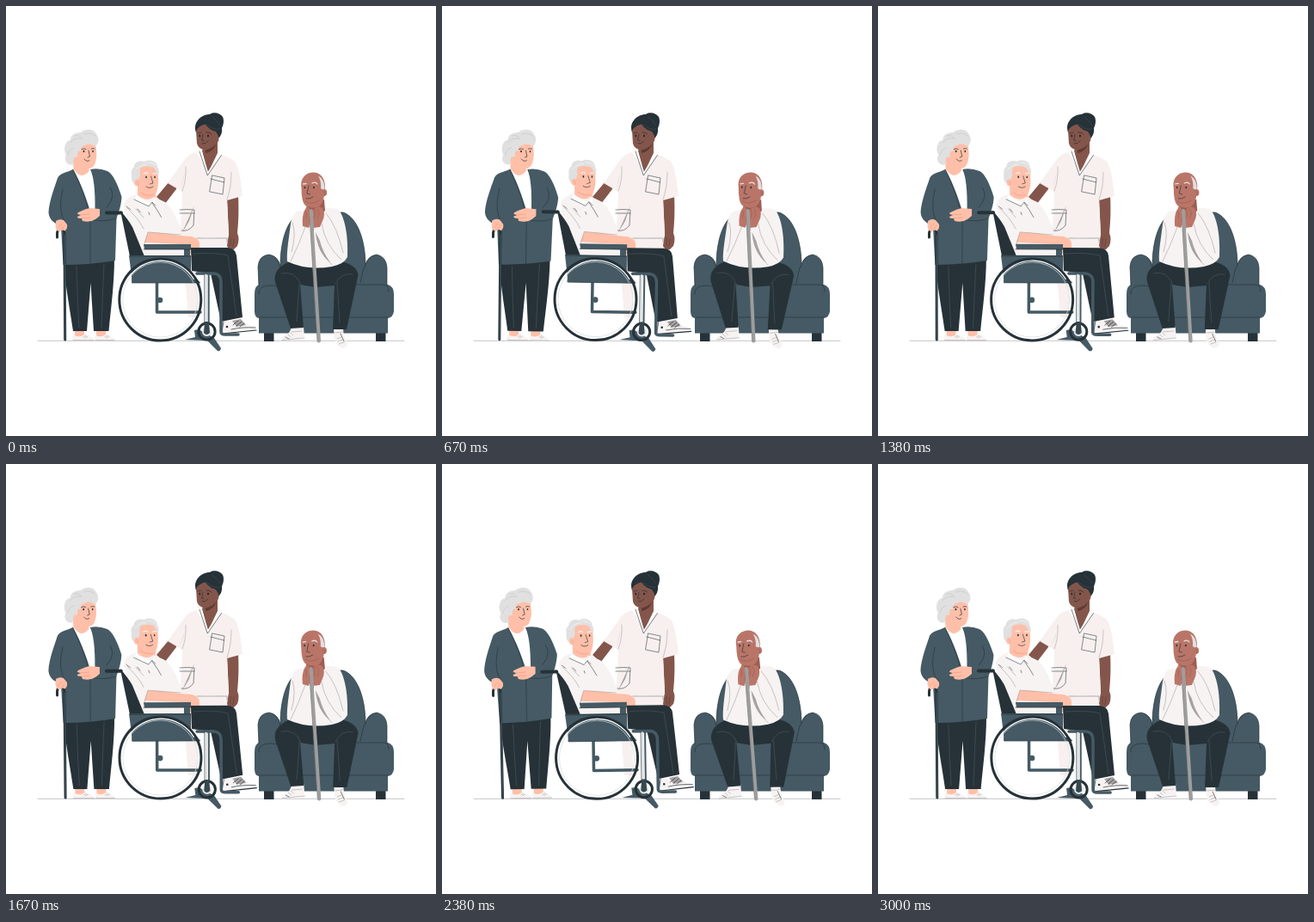
These frames come from a looping animation (500x500 px, 3040 ms). An HTML page:

```html
<!DOCTYPE html>
<html lang="en">
<head>
<meta charset="utf-8">
<title>Care home</title>
<style>
  html, body { margin: 0; width: 100%; height: 100%; overflow: hidden; background: #fff; }
  svg { display: block; width: 100vw; height: 100vh; }
</style>
</head>
<body>
<svg id="stage" viewBox="0 0 500 500" xmlns="http://www.w3.org/2000/svg"></svg>
<script>
const INK = '#263238', SLATE = '#455a64', DEEP = '#37474f';
const PEACH = '#ffbfa8', PEACH_SHADE = '#f0937c';
const BROWN = '#84564b', BROWN_SHADE = '#5d3a32', TAN = '#b97568', TAN_SHADE = '#9d5d50';
const SCRUBS = '#f7f0ee', SHIRT = '#f7f3f2', HAIR = '#e0e0e0', FOLD = '#a7a2a2';

const fill = (color, d) => `<path d="${d}" fill="${color}"/>`;
const line = (color, width, d) =>
  `<path d="${d}" fill="none" stroke="${color}" stroke-width="${width}" stroke-linecap="round" stroke-linejoin="round"/>`;
const disc = (color, x, y, rx, ry = rx) => `<ellipse cx="${x}" cy="${y}" rx="${rx}" ry="${ry}" fill="${color}"/>`;
const ring = (color, width, x, y, r) =>
  `<circle cx="${x}" cy="${y}" r="${r}" fill="none" stroke="${color}" stroke-width="${width}"/>`;
const group = (id, ...parts) => `<g id="${id}">${parts.join('')}</g>`;

const floor = line('#b4b9bc', .8, 'M37 389.3H463');

const woman = group('woman',
  // feet and trousers
  fill(SHIRT, 'M79 382C84 384 87 382 90 381L101 386Q103 388 101 389H78Q76 386 79 382ZM105 382C109 384 113 382 116 381L125 386Q127 388 125 389H104Q102 386 105 382Z'),
  fill(PEACH, 'M80 376H91V382Q86 386 80 383ZM105 376H116V382Q110 386 105 383Z'),
  line(FOLD, .6, 'M78 388.6H102M104 388.6H126M90 385L93 383M92 386L95 384M115 385L118 383M117 386L120 384'),
  fill(INK, 'M67 298L126 293C126 322 122 352 119.500 378H102L98.500 322L94 378H78C74 350 69 326 67 298Z'),
  line('#526069', .5, 'M82 303Q83 340 85 374M114 300Q112 340 111 374'),
  // neck and blouse
  fill(PEACH, 'M77 178L96 184L97 194Q88 203 79 191Z'),
  fill('#fff', 'M79 190Q88 204 98 190L103 195Q105 216 103 238L97 240L82 202Z'),
  // cardigan
  fill(SLATE, 'M78 190C70 194 63 194 60 200C56 212 50 228 49.500 240C50 246 53 250 58 253L64 257L66.500 301Q98 301 127 296L128.500 247C131 240 134 232 134.500 222C130 207 124 195 118 192Q108 188 98 190Q104 202 103.500 238L100 246C96 231 88 207 78 190Z'),
  line(INK, .6, 'M78 190C87 209 95 229 98 248V299M66 213C63 228 62 240 68 250M121 211C126 219 124 226 117 234M98 248Q114 252 128 247'),
  // hands and stick
  fill(PEACH, 'M109 236L97 235Q92 236 84 240Q81 242 87 243L83 245Q82 247 88 247L89 250Q98 252 104 248L109 244Z'),
  line(PEACH_SHADE, .6, 'M87 243L97 242M88 247L98 246'),
  line(INK, 3, 'M59.500 269V264Q60 259 66 259Q68 260 68 266L68.700 388'),
  line(SLATE, 1, 'M68.400 266L69 388'),
  fill(PEACH, 'M58 250Q62 247 67 249L71 254Q72 259 68.500 261.500L66 260.500L62 262.500Q58 261 57.500 256Z'),
  line(PEACH_SHADE, .6, 'M61 258L65 253M65 260L68 255'),
  // head
  fill(HAIR, 'M79 184C72 187 66 180 70 173C66 167 69 156 75 156C75 149 82 147 87 147C93 142 103 143 105 149C109 153 108 160 104 163L92 177Z'),
  fill(PEACH, 'M83 166C88 163 90 160 93 160L104 161C106 171 106 179 102 186Q96 192 86 187L79 183Q76 176 83 177Z'),
  fill(HAIR, 'M79 181Q74 174 79 164L88 154L105 153Q107 159 103 163Q97 158 92 162Q87 162 87 169Q83 167 83 175Z'),
  disc(PEACH, 81.500, 179, 3, 3.500),
  line('#c3c3c3', .6, 'M75 159Q79 153 87 154M72 173Q74 166 79 165M91 149Q98 146 104 151M80 151Q86 149 89 155'),
  disc(INK, 90.500, 169, .9, 1.200), disc(INK, 101, 169, .8, 1.200),
  line(INK, .7, 'M88 166.500Q91 165 93 166.500M99 166Q101 165 103 166M96 168L97.500 175L95 176M91 178Q94 182 97 179.500')
);

const nurse = group('nurse',
  fill(SCRUBS, 'M205 262H258V282H222V362H212L207 300Z'),
  line('#a9adaf', 1, 'M222 270H257V274'),
  // arms
  fill(BROWN, 'M190 204L175 222L184.500 230.500L198 213L200 205ZM257 223L270 220C271 240 270 254 269 264Q272 271 269 279L265 283Q259 284 257 279L259 265Z'),
  line(BROWN_SHADE, .6, 'M261 270V279M265 271L264 280'),
  // scrubs
  fill(SCRUBS, 'M221 170Q210 173 206 181L188 206L205 216C205 232 203 251 202 267Q230 271 259 268L257 226L275 221C273 203 271 188 266 181Q259 175 250 173L234 190Z'),
  fill(BROWN, 'M228 169L231 158L246 152L246 171L234.500 195Z'),
  line('#fff', 2, 'M227 169L234.500 195L248.500 173'),
  line(INK, .6, 'M225 169L234.300 197L250.500 173.500'),
  line(INK, .55, 'M240 197L254 200L252 219L237 216ZM238 201L253.500 205M202 237Q211 236 219 237L218 255Q212 263 204 261M202 241H219'),
  fill(FOLD, 'M265 201L256 224L261 211ZM208 193L203 211L206 201ZM219 232L204 265L213 250Z'),
  line(FOLD, .55, 'M262 193Q262 211 257 225M209 187Q210 202 205 215'),
  // head
  fill(INK, 'M221 147C217 136 226 126 237 126C240 123 250 124 252.500 130Q254 136 251 142Q252 150 246 155L236 150Z'),
  fill(BROWN, 'M221 145Q224 139 232 137.500Q236 144 244 146L246.500 150Q249 156 245 160Q241 166 232 167.500Q224 167 222 160Z'),
  fill(BROWN_SHADE, 'M232 167.500Q240 166 244.500 160Q242 169 232 171Z'),
  line('#47555d', .5, 'M234 138Q242 145 249 143M240 129Q246 134 249 139'),
  disc('#151a1d', 225.300, 151, .8, 1.200), disc('#151a1d', 235, 151, .9, 1.200),
  line(INK, .7, 'M223 148L227 147M233 147Q236 146 239 149M229 149L227.500 156L230 156.500M228 160Q232 161 235 157')
);

const wheelchair = group('chair',
  // patient
  fill(PEACH, 'M153 207L174 215L174 227Q163 235 153 220Z'),
  fill(SHIRT, 'M152 219Q140 222 137 230Q137 242 145 255L160 290H212L204 262C199 246 193 235 185 228L172 222Q164 229 152 219Z'),
  fill('#fff', 'M152 219L149 225L166 233L170 228Q159 228 152 219ZM170 228L174 232L173 223Z'),
  line(INK, .55, 'M149 225L166 233L170 228L174 232M170 229Q184 248 188 263M140 233Q150 239 155 254M166 240Q169 252 177 258M153 236L162 247'),
  fill(PEACH, 'M163 261L203 267L216 268Q226 271 225 278Q226 286 218 288Q213 290 211 285L214 280L204 277L161 275Q158 267 163 261Z'),
  fill(SHIRT, 'M138 235L160 277L165 263Q190 264 203 266L199 249L170 244Z'),
  line(FOLD, .6, 'M161 277L165 263L203 266M141 235Q154 247 160 259M151 236L160 246'),
  // patient head
  fill(PEACH, 'M151 190Q164 182 175 188C178 199 178 210 174 219Q166 225 154 216Z'),
  fill(HAIR, 'M150 207Q145 205 146 196Q145 190 149 187C149 181 156 179 161 181C167 177 177 181 176 187Q179 191 177 197Q174 191 172 188Q164 185 157 188Q155 190 156 197L153 206Z'),
  disc(PEACH, 152.500, 205.500, 3.200, 4),
  line('#f4f4f4', .8, 'M150 191Q156 184 163 184M165 182Q171 182 174 185'),
  disc(INK, 163, 199, .9, 1.300), disc(INK, 173, 199, .8, 1.200),
  line('#ededed', 1.300, 'M160 195Q163 193 165 195M171 195L175 194.500'),
  line(INK, .65, 'M168.500 198L171 206L167.500 207M163 210Q167 213 171 210'),
  line(PEACH_SHADE, .6, 'M152 204Q155 205 153 208M157 217Q164 222 171 220'),
  // legs and shoe
  fill(INK, 'M215 281H258Q267 282 268 290L275 362L250 367L238 311L216 308Z'),
  line('#526069', .5, 'M218 288Q243 286 258 290L268 360'),
  fill(SHIRT, 'M250 367Q260 368 272 363Q278 371 289 372.500Q293 374 291 377L252 381Q249 376 250 367Z'),
  fill(FOLD, 'M263 366L273 364L279 371L268 373Z'),
  line(INK, 1.200, 'M251 381L291 377'),
  line(INK, .7, 'M264 371L270 366M268 372L274 367M272 373L277 369M262 376Q275 373 290 374M253 367L251 379'),
  disc(INK, 257, 373, 1.300),
  // frame
  line(INK, 4, 'M117 240.500H134'),
  fill(INK, 'M133 238Q142 248 147 257L161 291H144Z'),
  fill(SLATE, 'M160 277H215V283H161ZM207 282H214V292H207ZM143 290H215V310L226 322H147Z'),
  line(INK, .7, 'M160 283H215M144 291H214'),
  line(SLATE, 3.500, 'M222 311H242Q250 312 250 321V379Q250 382 255 382H270'),
  line('#dfe2e3', 2.500, 'M232.500 313V369'),
  line(SLATE, 2, 'M235.700 313V370'),
  line(INK, .6, 'M230.700 313V368'),
  disc(SLATE, 179, 342, 3.300),
  line(SLATE, 3.500, 'M175.500 321V356H226'),
  fill(SLATE, 'M147 303Q179 294 215 308L226 322H146Z'),
  line('#2f4049', .7, 'M147 322H225'),
  ring('#d8dcde', .7, 179.300, 341.500, 43.600),
  ring(INK, 3, 179.300, 341.500, 47.500),
  line('#fff', 1.200, 'M142.300 316.500A45 45 0 0 1 218.300 317.500'),
  // front caster and foot rest
  fill(SLATE, 'M208 388L220 385L219 377L224 376L242 386L250 398Q249 402 246 401L234 389Z'),
  ring(INK, 3, 233.500, 378.500, 9.600),
  disc('#e3e6e7', 233.500, 378.500, 5.500),
  fill(DEEP, 'M231 367H236L237 380Q233 384 230 380Z'),

);

const BACKREST = 'M319 302C319 270 328 246 344 240H392C409 246 418 273 418 302';
const sofa = group('sofa',
  fill(INK, 'M300 379H311.500V390H300ZM430 379H441.500V390H430Z'),
  fill(SLATE, BACKREST + 'V340H319Z'),
  line(INK, .7, BACKREST),
  fill(SLATE, 'M294 330L293 303Q294 290 306 289Q318 291 320 306V330ZM415 330L417 303Q420 290 431 289Q443 292 443 306V330ZM294 324H444Q451 326 451 335V355Q450 362 444 363V380.500H294V363Q289 362 289 355V335Q289 326 294 324Z'),
  line(INK, .65, 'M294 325L293 303Q294 290 306 289Q317 291 319 304M443 325V304Q442 291 431 289Q420 291 417 304M397 324H440Q445 325 445 332M295 362H330M390 362H444M345 362H380M316 326Q293 322 294 335M416 304L412 322')
);

const sitter = group('sitter',
  // shoes
  fill(SHIRT, 'M332 372H346L347 386Q337 389 322 389Q318 387 323 384Q331 381 332 372ZM381 374H392Q392 384 397 392Q397 397 392 398Q385 396 382 388Z'),
  line(FOLD, .6, 'M321 388.500L347 386M332 379L344 378M328 382L331 385M331 380L334 383M383 380L391 379M385 387L390 385M386 390L392 388M387 393L393 391'),
  line(INK, .6, 'M325 385L329 387M389 381L393 390'),
  // trousers
  fill(INK, 'M328 298H393Q408 302 409.500 313L396 376H380L382 325L360 327L342 324L346 374L331 375L313 321Q310 306 328 298Z'),
  line('#526069', .5, 'M320 311Q336 307 343 324M403 312Q390 309 383 323M341 323L338 367M385 322L388 368'),
  // shirt
  fill(SHIRT, 'M344 238Q334 237 331 253C329 270 326 286 327 297Q350 308 379 303Q393 300 397 292C398 270 395 248 387 237Q378 233 366 236Z'),
  line(FOLD, .6, 'M333 252Q338 265 332 286M348 257Q340 279 331 297M367 253Q371 278 390 295M372 241Q385 256 392 287M357 262L358 299M362 269Q364 287 379 301'),
  fill(FOLD, 'M360 263Q362 287 377 298Q368 286 365 273Z'),
  // head
  fill(TAN_SHADE, 'M350 225H370L371 238Q361 247 349 239Z'),
  fill(TAN, 'M343.500 211C341.500 199 350 193 358.500 193.500Q370 195 371 209Q371 227 364.500 233Q357 237 348 232Q343.500 228 343.500 211Z'),
  fill(HAIR, 'M363 197.500Q371 201 370.500 215L366 212Q367 204 363 197.500Z'),
  disc(TAN, 370, 217, 3.200, 4),
  line(TAN_SHADE, .7, 'M369 216Q372 215 370.500 220M348 227Q355 232 364 226'),
  line('#e7e0dd', 1.300, 'M345.500 207L349 206.500M356 206Q360 204 362 207'),
  disc(INK, 347.500, 211, .8, 1.200), disc(INK, 358, 211, .9, 1.200),
  line(INK, .65, 'M352 209L350 218L353.500 219M349 224Q353 225 357 222'),
  // stick and clasped hands
  line('#9e9e9e', 4, 'M354.500 239L364 389.500'),
  line('#777', .6, 'M353 244L362 390'),
  fill(TAN, 'M350 233Q354 235 354 241L358 236Q364 232 368 235Q372 242 368 250L365 257L357 258L355 250L352 258L345 256Q344 244 347 238Z'),
  line(TAN_SHADE, .7, 'M354 241L353 250M358 236Q361 242 358 247M362 236Q366 241 362 247M349 239Q350 243 349 247'),
  line('#9e9e9e', 4, 'M354.800 238L356.200 260')
);

const stage = document.getElementById('stage');
stage.innerHTML = floor + sofa + woman + nurse + wheelchair + sitter;

const LOOP = 3040;
const PIVOTS = { woman: '92 266', chair: '204 290', sitter: '361 295' };

// Triangle wave: 0, 1 at a quarter, -1 at three quarters, 0.
function sway(phase) {
  if (phase < .25) return phase * 4;
  if (phase < .75) return 2 - phase * 4;
  return phase * 4 - 4;
}

function draw(time) {
  const angle = sway(time % LOOP / LOOP).toFixed(4);
  for (const id in PIVOTS)
    document.getElementById(id).setAttribute('transform', `rotate(${angle} ${PIVOTS[id]})`);
}

const start = performance.now();
function tick() {
  draw(performance.now() - start);
  requestAnimationFrame(tick);
}
tick();
</script>
</body>
</html>
```
